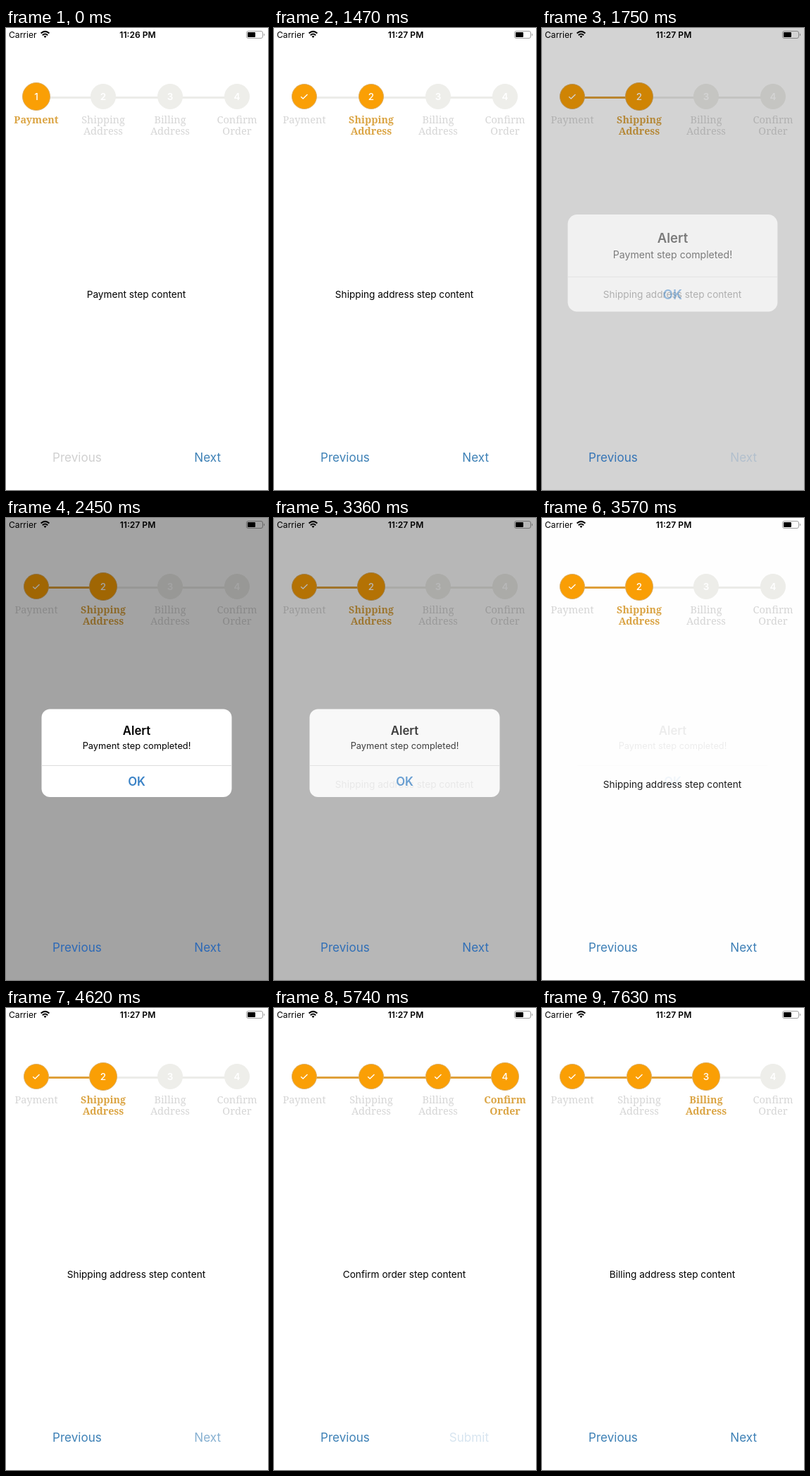
Write an HTML page that moves like this. It is 372x654 px and loops after 8000 ms.

```html
<!DOCTYPE html>
<html lang="en">
<head>
<meta charset="utf-8">
<title>Checkout steps</title>
<style>
  html, body { margin: 0; width: 100%; height: 100%; overflow: hidden; background: #fff; }
  svg { display: block; width: 100%; height: 100%; font-family: Inter, Roboto, sans-serif; }
  .mid { text-anchor: middle; }
  .label { font: 500 14.6px "Noto Serif", serif; text-anchor: middle; fill: #d6d6d6; }
  .label.active { font-weight: 600; font-size: 14.3px; fill: #dba545; }
  .digit { font-size: 13.5px; fill: #fff; text-anchor: middle; }
  .button { font-size: 17.1px; }
  .status { font-size: 12.1px; }
  .bold { font-weight: 600; }
</style>
</head>
<body>
<svg viewBox="0 0 372 654">
  <rect width="372" height="654" fill="#fff"/>
  <path d="M43 98.5H328" stroke="#ecece9" stroke-width="3"/>
  <path id="progress" stroke="#dfa03a" stroke-width="3"/>
  <g id="steps"></g>
  <text id="content" class="mid" x="185" y="382" font-size="13.65"></text>

  <text class="status" x="4" y="13.5">Carrier</text>
  <g fill="none" stroke="#000" stroke-width="2">
    <path d="M49.6 7.6Q55.5 2.2 61.4 7.6M51.8 10.2Q55.5 6.8 59.2 10.2"/>
    <path d="M55.5 14L53.5 11.8Q55.5 10.2 57.5 11.8Z" fill="#000" stroke="none"/>
  </g>
  <text id="clock" class="status bold mid" x="187" y="13.5"></text>
  <rect x="341.5" y="4.5" width="23" height="10" rx="2.5" fill="none" stroke="#a0a0a0"/>
  <rect x="343" y="6" width="11" height="7" rx="1"/>
  <path d="M366 7.5Q368 9.5 366 11.5Z" fill="#8c8c8c"/>

  <rect id="dim" width="372" height="654"/>
  <text id="previous" class="button" x="66" y="614">Previous</text>
  <text id="next" class="button" x="305" y="614" text-anchor="end"></text>

  <g id="alert">
    <rect id="alertBox" x="50.5" y="270.5" width="270" height="124.5" rx="12" fill="#fff"/>
    <g id="alertText" class="mid">
      <path d="M50.5 350.5H320.5" stroke="#dcdcdc"/>
      <text class="bold" x="185.5" y="306.5" font-size="16.8">Alert</text>
      <text x="185.5" y="326.5" font-size="12.8">Payment step completed!</text>
      <text class="bold" x="185.5" y="379" font-size="16.8" fill="#3a82c6">OK</text>
    </g>
  </g>
</svg>
<script>
const LOOP = 8000;
const STEPS = [
  { label: ['Payment'], content: 'Payment step content' },
  { label: ['Shipping', 'Address'], content: 'Shipping address step content' },
  { label: ['Billing', 'Address'], content: 'Billing address step content' },
  { label: ['Confirm', 'Order'], content: 'Confirm order step content' }
];
const TAPS = [
  { button: 'next', press: 1470, release: 1470, from: 0, to: 1 },
  { button: 'next', press: 4550, release: 4830, from: 1, to: 2 },
  { button: 'next', press: 5460, release: 5460, from: 2, to: 3 },
  { button: 'previous', press: 6790, release: 7070, from: 3, to: 2 }
];
const BLUE = [62, 129, 182], DIMMED_BLUE = [45, 105, 182];

const el = id => document.getElementById(id);
const ramp = (t, start, length) => Math.min(1, Math.max(0, (t - start) / length));
const mix = (a, b, k) => a + (b - a) * k;
const set = (node, attrs) => {
  for (const name in attrs) node.setAttribute(name, attrs[name]);
};
const stepX = i => 43 + 95 * i;

el('steps').innerHTML = STEPS.map(({ label }, i) => `
  <g>
    <circle cx="${stepX(i)}" cy="97"/>
    <text class="digit" x="${stepX(i)}" y="101.8">${i + 1}</text>
    <path d="M${stepX(i) - 4.8} 97.3l3 2.7 6.3-6" fill="none" stroke="#fff" stroke-width="1.3"/>
    <g>${label.map((line, row) =>
      `<text x="${stepX(i)}" y="${134.5 + 16.5 * row}">${line}</text>`).join('')}</g>
  </g>`).join('');
const stepNodes = [...el('steps').children];

const alertShown = t => 1 - (1 - ramp(t, 1610, 500)) ** 2;
const alertHidden = t => (1 - Math.cos(Math.PI * ramp(t, 3220, 420))) / 2;

function buttonOpacity(t, name) {
  const tap = TAPS.filter(p => p.button === name && t >= p.press).pop();
  if (!tap) return 1;
  return 1 - 0.8 * ramp(t, tap.press, 150) * (1 - ramp(t, tap.release + 280, 210));
}

function drawSteps(t) {
  const tap = TAPS.filter(p => t >= p.release).pop();
  const current = tap ? tap.to : 0;
  const position = tap ? mix(tap.from, tap.to, ramp(t, tap.release, 200)) : 0;
  const grown = tap ? ramp(t, tap.release + 200, 80) : 1;

  set(el('progress'), { d: `M43 98.5H${stepX(position)}` });
  stepNodes.forEach((node, i) => {
    const [circle, digit, check, label] = node.children;
    const reached = i <= current;
    set(circle, {
      r: i === current ? mix(17.5, 19.5, grown) : 17.5,
      fill: reached ? '#fa9f05' : '#eeeeea',
      stroke: reached ? '#dcae62' : '#eeeeea'
    });
    set(digit, { opacity: i < current ? 0 : 1, 'font-weight': reached ? 500 : 600 });
    set(check, { opacity: i < current ? 1 : 0 });
    set(label, { class: i === current ? 'label active' : 'label' });
  });
  return current;
}

function draw(t) {
  const current = drawSteps(t);
  el('content').textContent = STEPS[current].content;
  el('clock').textContent = t < 1470 ? '11:26 PM' : '11:27 PM';

  const shown = alertShown(t);
  const amount = shown * (1 - alertHidden(t));
  const blue = `rgb(${BLUE.map((c, i) => Math.round(mix(c, DIMMED_BLUE[i], amount)))})`;
  el('next').textContent = current === 3 ? 'Submit' : 'Next';
  set(el('next'), { fill: blue, opacity: buttonOpacity(t, 'next') });
  set(el('previous'), {
    fill: current ? blue : '#d0d0d0',
    opacity: buttonOpacity(t, 'previous')
  });

  const scale = 1.2 - 0.2 * shown;
  set(el('dim'), { opacity: 0.36 * ramp(amount, 0.06, 0.88) });
  set(el('alert'), { transform: `translate(185.5 332.7) scale(${scale}) translate(-185.5 -332.7)` });
  set(el('alertBox'), { opacity: 1 - (1 - amount) ** 1.75 });
  set(el('alertText'), { opacity: amount });
}

const start = performance.now();
function tick() {
  draw((performance.now() - start) % LOOP);
  requestAnimationFrame(tick);
}
tick();
</script>
</body>
</html>
```
